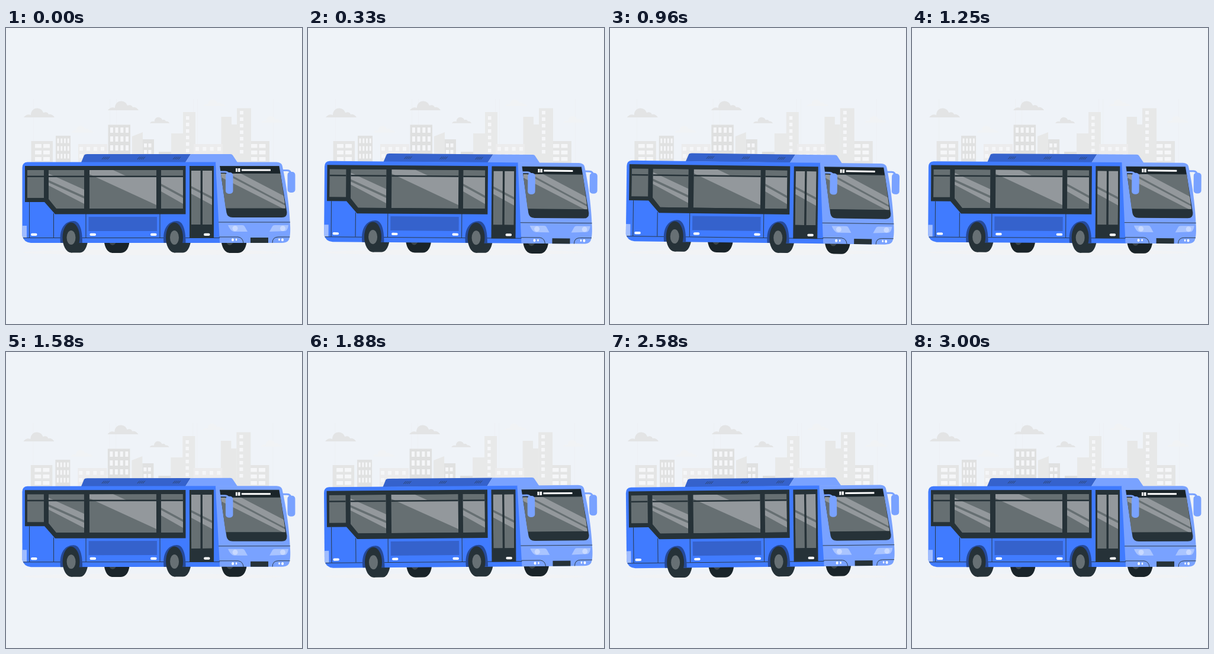
Write an HTML page that moves like this. It is 500x500 px and loops after 3040 ms.

```html
<!DOCTYPE html>
<html lang="en">
<head>
<meta charset="utf-8">
<title>Rocking bus</title>
<style>
html, body { margin: 0; width: 100%; height: 100%; overflow: hidden; background: #eff3f8; }
svg { display: block; width: 100%; height: 100%; }
.line { fill: none; stroke: #263238; stroke-width: .9; }
.dark { fill: #263238; }
.deep { fill: #1a2429; }
.blue { fill: #407bff; }
.shade { fill: #3562cc; }
.pale { fill: #79a2ff; }
.glass { fill: #666f72; }
.shine { fill: #93989c; }
.hub { fill: #677074; }
.arch { fill: #264a99; }
.white { fill: #fff; }
</style>
</head>
<body>
<svg viewBox="0 0 500 500">
  <defs>
    <path id="cloud" d="M0 16C3 12 7 10 12 12C12 2 21-2 28 2C31 3 32 6 33 8C38 6 41 8 42 11C47 10 50 13 52 16Z"/>
    <clipPath id="sidePanes">
      <path d="M36 240H64V287H36ZM72 240H132V305H85L72 289ZM141 240H254V305H141ZM262 240H299V305H262Z"/>
    </clipPath>
    <clipPath id="doorPanes"><path d="M313 241H328.5V332H313ZM332 241H348V332H332Z"/></clipPath>
    <clipPath id="frontPane"><path d="M363 246H464L472 304.5H371Z"/></clipPath>
  </defs>
  <ellipse cx="248" cy="379" rx="220" ry="4.5" fill="#f2f3f5"/>
  <g id="city"></g>

  <g id="bus">
    <g class="deep">
      <path d="M165 354H209C209 371 203 380 194 380H181C172 380 166 372 165 354Z"/>
      <path d="M363 354H407C407 371 401 380 392 380H379C370 380 364 372 363 354Z"/>
    </g>
    <g class="hub" opacity=".45">
      <ellipse cx="180" cy="356" rx="7" ry="11"/><ellipse cx="378" cy="356" rx="7" ry="11"/>
    </g>
    <g class="dark">
      <path d="M110 340H139.500C140 366 134 379.500 125 379.500H110Z"/>
      <path d="M284 340H313.500C314 366 308 379.500 299 379.500H284Z"/>
    </g>

    <path class="shade" d="M137 213H312L303 227H127L132 215Q133 213 137 213Z"/>
    <path class="pale" d="M312 213H379Q382 213 383 215L391 227H303Z"/>
    <g id="vents" class="line"></g>

    <path class="blue" d="M36 226.500H355L362 363H42Q30 362 27.500 351V236Q27.500 227 36 226.500Z"/>
    <path class="pale" d="M354 226.500H457Q465 227 466.500 232C474 265 479 305 480 333Q481 353 477 359Q474 363 465 363H361Z"/>
    <path d="M27.500 334H35V354H28.500L27.500 351Z" fill="#9fbcff"/>

    <path class="line" d="M29 354.500H361M39.500 294V354M80.500 313V354M135 314V354M260 314V354"/>
    <path class="shade" d="M139.500 319H255V343H139.500Z"/>

    <path class="dark" d="M32 233H303.500V314.500H83L65 294H32Z"/>
    <g clip-path="url(#sidePanes)">
      <path class="glass" d="M32 233H303V314H32Z"/>
      <path class="shine" d="M141 240H181L205 251H254V299L141 247ZM72 246L132 273V284L72 257ZM72 261L132 288V297L72 266ZM262 251H299V283L262 263ZM262 267L299 287V297L262 276Z"/>
      <path class="dark" d="M32 249.500H303V252H32Z"/>
    </g>

    <path class="dark" d="M310 233H351V355H310Z"/>
    <g clip-path="url(#doorPanes)">
      <path class="glass" d="M310 233H351V340H310Z"/>
      <path class="shine" d="M313 241H348V285L313 267ZM313 271L348 289V299L313 280Z"/>
    </g>

    <g id="pills" class="white"></g>
    <g id="wheels"></g>

    <path class="dark" d="M361 233H461.500L474.500 311Q475 320 466 320H383Q374 320 372.500 312Z"/>
    <path class="deep" d="M362 234H461L463 245H363Z"/>
    <g clip-path="url(#frontPane)">
      <path class="glass" d="M360 240H480V310H360Z"/>
      <path class="shine" d="M363 246H387L471 290V305L363 250ZM400 246H410L471 278V284Z" opacity="0"/>
      <path class="shine" d="M376 246H397L472 285V297ZM363 246H369L472 300V307L363 252Z"/>
    </g>
    <path class="white" d="M388 237H391V243H388ZM392 237H395.500V243H392ZM398 238.500H447V241.500H398Z"/>

    <path class="line" d="M359 328H480M360 353H392Q400 354 401 363M450 363Q450 353 460 353H479.500"/>
    <g fill="#a9c4ff">
      <path d="M375 333H399Q402 333 403 335L408 344H385Q379 343 375 333Z"/>
      <path d="M454 333H477Q476 341 472 343L445 344L450 335Q451 333 454 333Z"/>
    </g>
    <g fill="#c8d9ff"><circle cx="387" cy="338.500" r="4.500"/><circle cx="467.500" cy="338.500" r="4.500"/></g>
    <g class="white">
      <ellipse cx="383" cy="357.700" rx="2" ry="2.500"/><ellipse cx="389" cy="357.500" rx="1.300" ry="2"/>
      <ellipse cx="461.500" cy="357.500" rx="1.300" ry="2"/><ellipse cx="467" cy="357.700" rx="2" ry="2.500"/>
    </g>
    <path class="dark" d="M413 354H443V363H413Z"/>

    <g fill="none" stroke="#79a2ff" stroke-width="3">
      <path d="M362 243H370Q376 243 377 250M466 240.500H475Q481 240.500 482 248"/>
    </g>
    <rect class="pale" x="371" y="244" width="12.500" height="36" rx="5"/>
    <rect class="pale" x="475.500" y="243" width="13" height="35" rx="5"/>
  </g>
</svg>
<script>
const PERIOD = 3040;
const get = id => document.getElementById(id);
const rect = (x, y, w, h, fill) => `<rect x="${x}" y="${y}" width="${w}" height="${h}" fill="${fill}"/>`;
const shape = (d, fill) => `<path d="${d}" fill="${fill}"/>`;
const cloud = (x, y, scale, fill) =>
  `<use href="#cloud" transform="translate(${x} ${y}) scale(${scale})" fill="${fill}"/>`;

function building(x, top, w, fill, cols = [], firstRow = 0, step = 1, rows = 0, paneW = 0, paneH = 0) {
  let out = rect(x, top, w, 300 - top, fill);
  for (let r = 0; r < rows; r++)
    for (const c of cols) out += rect(c, firstRow + r * step, paneW, paneH, '#f5f6f8');
  return out;
}

get('city').innerHTML = [
  ...[46, 175, 186, 316, 323, 451].map(x => rect(x, 120, 1, 110, '#edf0f4')),
  cloud(30, 135, 1, '#e3e4e5'), cloud(172, 123, 1, '#e3e4e5'), cloud(243, 150.5, .64, '#e3e4e5'),
  cloud(110, 165, .72, '#f1f3f5'), cloud(333, 120.5, .72, '#f1f3f5'), cloud(431, 148.5, .72, '#f1f3f5'),
  building(122, 196, 49, '#ececed', [124, 136, 148, 160], 201, 12, 2, 6, 6.5),
  building(42.5, 191, 36.5, '#e4e5e5', [49, 63], 196, 11, 3, 11, 6.5),
  building(84, 182, 25, '#e0e1e1', [86.5, 92.3, 98, 103.8], 186.5, 13, 3, 3, 8),
  building(172.5, 163.5, 37.5, '#dfe0e0', [176, 184.5, 193.3, 202], 168, 15, 3, 5, 9),
  shape('M213 183L231 176V230H213Z', '#e7e8e8'),
  building(231, 188, 19, '#e0e1e1', [233, 240.5], 195, 11, 2, 5, 6.5),
  building(258, 209, 25, '#dfe0e0'),
  building(279, 178, 21, '#e8e9e9'),
  building(299, 142, 21, '#e8e9e9', [304], 149, 11, 6, 5.5, 6),
  shape('M363.5 150H381V163H390V230H363.5Z', '#e7e8e8'),
  building(317, 196, 49, '#ececed', [320, 332.3, 344.6, 357], 201, 12, 2, 6, 6.5),
  building(408, 191, 37, '#e4e5e5', [413.5, 427.5], 196, 11, 3, 11, 6.5),
  building(390, 135.5, 24, '#e7e8e8', [395], 140, 11, 7, 6, 6)
].join('');

get('vents').innerHTML = [162, 222, 282].map(x =>
  [0, 3, 6, 9].map(i => `<path opacity=".75" d="M${x + i} 222L${x + i + 4} 217.5"/>`).join('')).join('');

get('pills').innerHTML = [42, 141.5, 244, 334].map(x =>
  `<rect x="${x}" y="346.7" width="10.5" height="4.2" rx="2"/>`).join('');

get('wheels').innerHTML = [110, 284.5].map(x => `<g transform="translate(${x} 354)">
  <path class="arch" d="M-18 9C-21-17-9-28 4-28C13-28 19-17 19 9Z"/>
  <ellipse class="dark" rx="14.5" ry="25.500"/><ellipse class="hub" rx="7.500" ry="12"/></g>`).join('');

// Linear interpolation through [time, value] pairs.
function track(keys, t) {
  const i = Math.max(1, keys.findIndex(k => k[0] >= t));
  const [t0, v0] = keys[i - 1], [t1, v1] = keys[i];
  return v0 + (v1 - v0) * (t - t0) / (t1 - t0);
}

const tilt = [[0, 0], [PERIOD / 4, 1], [PERIOD * 3 / 4, -1], [PERIOD, 0]];
const drift = [[0, 0], [700, 0], [960, -1.2], [1580, -.6], [2170, -1.2], [2580, 0], [PERIOD, 0]];

function draw(time) {
  const t = time % PERIOD;
  get('bus').setAttribute('transform', `rotate(${track(tilt, t)} 257.5 296)`);
  get('city').setAttribute('transform', `translate(${track(drift, t)} 0)`);
}

const start = performance.now();
function tick() {
  draw(performance.now() - start);
  requestAnimationFrame(tick);
}
tick();
</script>
</body>
</html>
```
